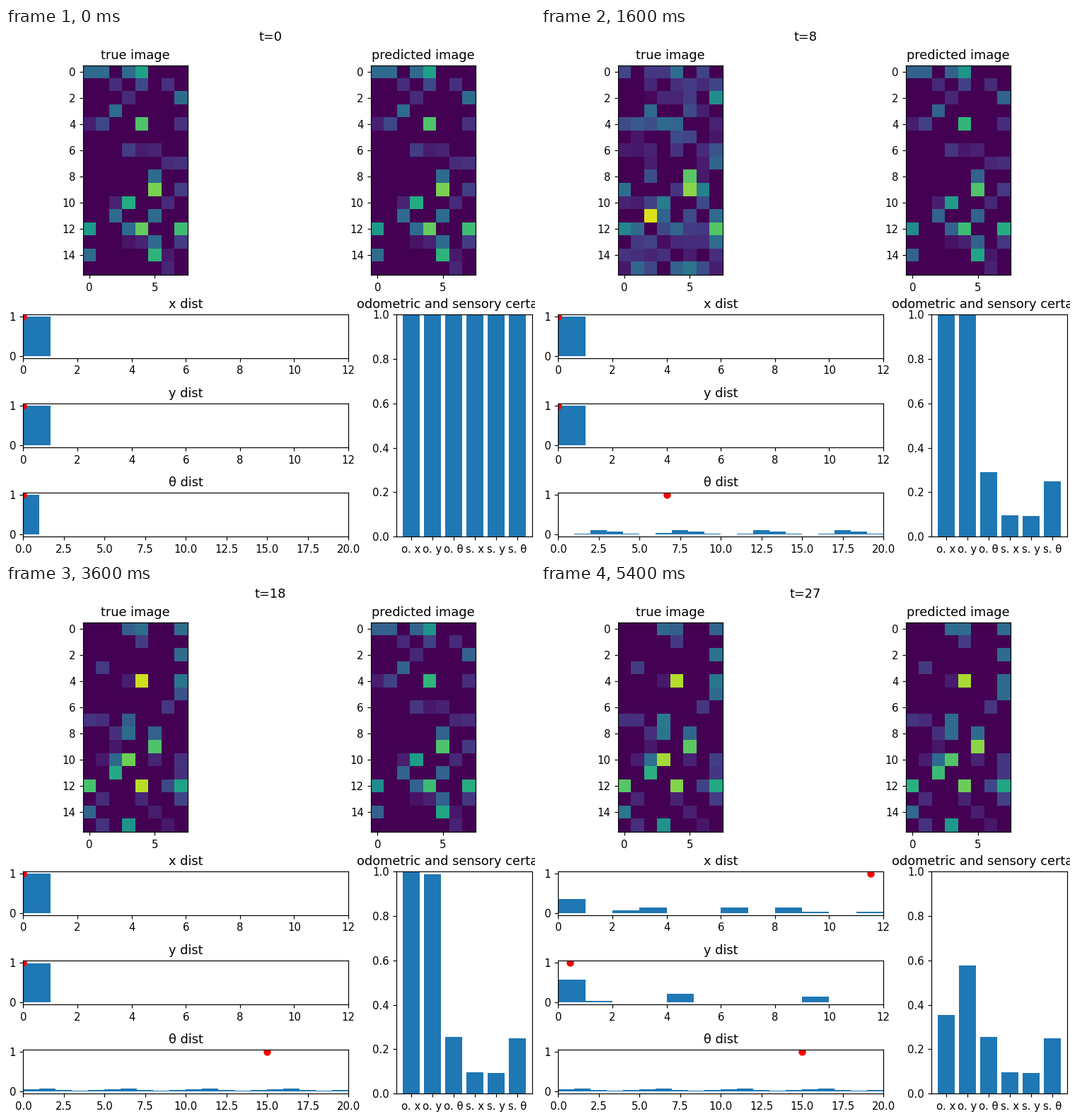
A matplotlib script that plays this animation: 748x748 px, repeating every 5600 ms.

```python
import numpy as np
import matplotlib.pyplot as plt
from matplotlib.animation import FuncAnimation

SIZE, STEPS, STEP_MS = 748, 28, 200
TURN_END = 18  # turns on the spot first, then walks
K = 8 / 7      # type and line scale
BLUE = "#1f77b4"

plt.rcParams.update({
    "font.family": "DejaVu Sans", "font.size": 10 * K,
    "axes.titlesize": 12 * K, "axes.titlepad": 6 * K, "axes.linewidth": 0.8 * K,
    "xtick.major.size": 3.5 * K, "ytick.major.size": 3.5 * K,
    "xtick.major.width": 0.8 * K, "ytick.major.width": 0.8 * K,
    "xtick.major.pad": 3.5 * K, "ytick.major.pad": 3.5 * K,
})


def view(seed, top, bright, mid=(), faint=22, haze=0.22):
    """Landmark cells, brightest first, over seeded faint ones."""
    rng = np.random.default_rng(seed)
    img = np.zeros(128)
    img[rng.choice(128, faint, replace=False)] = rng.uniform(0.05, haze, faint)
    img[list(mid)] = 0.35
    img[list(bright)] = np.linspace(top, 0.54, len(bright))
    return img.reshape(16, 8)


home = view(1, 0.8, (77, 100, 36, 103, 117, 83, 4, 96),
            mid=(0, 1, 3, 23, 26, 69, 90, 93, 99, 109, 112))
away = view(2, 0.87, (36, 77, 100, 83, 90, 96, 103, 123),
            mid=(3, 4, 7, 23, 39, 47, 59, 67, 69, 82, 112))
quarter = view(3, 1, (90, 100, 103, 4, 69, 97, 55, 33, 111, 77), faint=48, haze=0.42)
half = view(4, 0.92, (77, 90, 69, 83, 96, 78, 103, 35, 91, 23), faint=48, haze=0.42)
VIEWS = ((0, home), (5, quarter), (10, half), (14, home), (18, away), (27, away))


def seen(t):
    """Fade between neighbouring views, with sensor noise."""
    (a, first), (b, second) = next(p for p in zip(VIEWS, VIEWS[1:]) if t <= p[1][0])
    u = (t - a) / (b - a)
    noise = np.random.default_rng(100 + t).normal(size=first.shape)
    gain = 1 + 0.08 * noise * (t > 0)
    return np.clip(((1 - u) * first + u * second) * gain, 0, 1)


def expected(t):
    return away if t > TURN_END + 1 else home * (0.9 if t else 1)


def heading(t):
    return min(t, TURN_END) * 5 / 6


def turn_dist(t):
    """A spike that spreads into four lumps moving with the heading."""
    off = np.arange(20) - heading(t)
    spike = np.clip(1 - abs(off), 0, 1)
    lumps = np.exp((0.45 + 6 * np.exp(-t / 4)) * np.cos(2 * np.pi * (off - 0.6) / 5))
    stay = np.exp(-0.6 * t)
    return stay * spike + (1 - stay) * lumps / lumps.sum()


def walk_dist(t, start, rate, aliases):
    """Mass leaks from the first cell to its aliases."""
    stay = np.exp(-rate * max(t - start, 0))
    row = np.zeros(12)
    row[0] = stay
    for cell, share in aliases.items():
        row[cell] = share * (1 - stay)
    return row


X_ALIASES = {2: 0.11, 3: 0.22, 6: 0.24, 8: 0.24, 9: 0.07, 11: 0.07}
Y_ALIASES = {1: 0.11, 4: 0.52, 9: 0.34}

fig = plt.figure(figsize=(8, 8), dpi=SIZE / 8, facecolor="white")


def panel(x0, y0, x1, y1, title):
    ax = fig.add_axes([x0 / SIZE, 1 - y1 / SIZE, (x1 - x0) / SIZE, (y1 - y0) / SIZE])
    ax.set_title(title)
    return ax


def image_panel(x0, title):
    ax = panel(x0, 53.2, x0 + 148, 349.2, title)
    im = ax.imshow(home, vmin=0, vmax=1, cmap="viridis", aspect="auto",
                   interpolation="nearest")
    ax.set_xticks([0, 5])
    ax.set_yticks(range(0, 16, 2))
    return im


def dist_panel(row, n, ticks, title):
    y0 = 405.15 + 126.08 * row
    ax = panel(24.4, y0, 484.1, y0 + 61.9, title)
    bars = ax.bar(np.arange(n), np.zeros(n), width=1, align="edge", color=BLUE)
    dot, = ax.plot([0], [1], "o", color="red", ms=6 * K, mew=K)
    ax.set(xlim=(0, n), ylim=(-0.05, 1.05), xticks=ticks, yticks=[0, 1])
    return bars, dot


true_im = image_panel(108.7, "true image")
pred_im = image_panel(516.2, "predicted image")
dists = [dist_panel(0, 12, range(0, 13, 2), "x dist"),
         dist_panel(1, 12, range(0, 13, 2), "y dist"),
         dist_panel(2, 20, np.arange(0, 20.1, 2.5), "θ dist")]

sure_ax = panel(552.1, 405.15, 743.6, 719.2, "odometric and sensory certainties")
sure_bars = sure_ax.bar(range(6), np.ones(6), color=BLUE)
sure_ax.set(xlim=(-0.69, 5.69), ylim=(0, 1), yticks=np.arange(0, 1.1, 0.2))
sure_ax.set_xticks(range(6), ["o. x", "o. y", "o. θ", "s. x", "s. y", "s. θ"])

clock = fig.text(0.5, 1 - 18 / SIZE, "t=0", ha="center", va="baseline", fontsize=12 * K)


def set_bars(bars, heights):
    for bar, h in zip(bars, heights):
        bar.set_height(h)


def draw(t):
    clock.set_text(f"t={t}")
    true_im.set_data(seen(t))
    pred_im.set_data(expected(t))

    steps = max(t - TURN_END, 0)
    spots = (-0.0525 * steps % 12, 0.0485 * steps, heading(t))
    rows = (walk_dist(t, 19.1, 0.131, X_ALIASES),
            walk_dist(t, 17.8, 0.06, Y_ALIASES),
            turn_dist(t))
    for (bars, dot), row, spot in zip(dists, rows, spots):
        set_bars(bars, row)
        dot.set_xdata([spot])

    turn = 0.256 + 0.744 * np.exp(-0.39 * t)
    sensed = (0.095, 0.093, 0.25) if t else (1, 1, 1)
    set_bars(sure_bars, (rows[0][0], rows[1][0], turn, *sensed))
    return []


anim = FuncAnimation(fig, draw, frames=STEPS, init_func=lambda: draw(0),
                     interval=STEP_MS, repeat=True, repeat_delay=0, blit=False)
plt.show()
```
